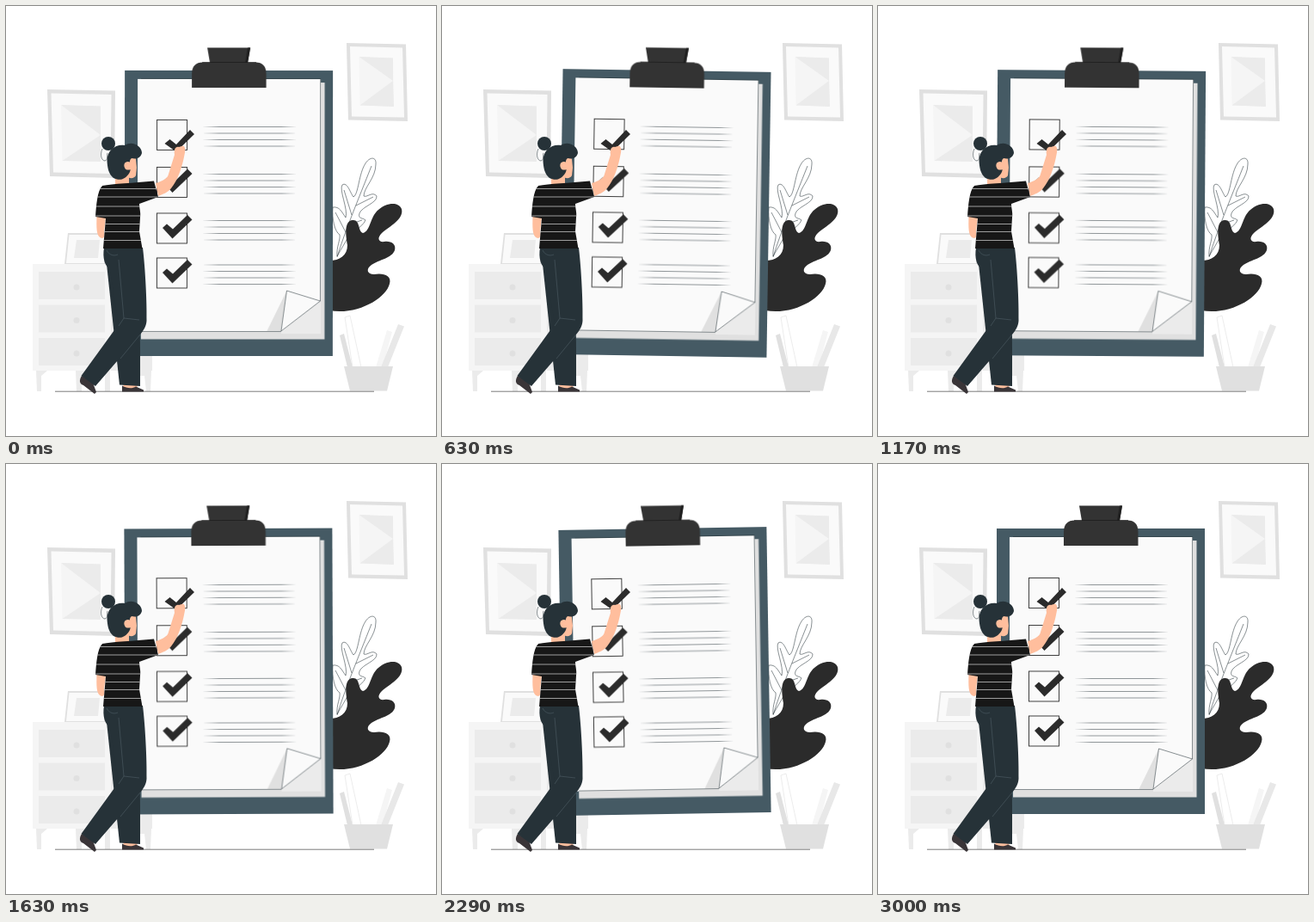
These frames come from a looping animation (500x500 px, 3040 ms). An HTML page:

```html
<!DOCTYPE html>
<html lang="en">
<head>
<meta charset="utf-8">
<title>Checklist</title>
<style>
html, body { margin: 0; width: 100%; height: 100%; overflow: hidden; background: #fff; }
svg { display: block; width: 100vw; height: 100vh; }
#board {
  transform-origin: 259px 240px;
  animation: sway 3040ms linear infinite;
}
@keyframes sway {
  0% { transform: rotate(.04deg); }
  23.7% { transform: rotate(1deg); }
  73% { transform: rotate(-1deg); }
  100% { transform: rotate(.04deg); }
}
.ink { fill: #2b2b2b; }
.clip { fill: #333; }
.navy { fill: #263238; }
.skin { fill: #ffbe9d; }
.shoe { fill: #3a3538; }
.thin { fill: none; stroke: #263238; stroke-width: .55; }
.pale { fill: #fafafa; }
.g1 { fill: #f5f5f5; }
.g2 { fill: #ebebeb; }
.g3 { fill: #e0e0e0; }
</style>
</head>
<body>
<svg viewBox="0 0 500 500">
  <defs>
    <path id="tick" d="M7 17.5 12 13 19 19 36 2.500 41.500 8 18.500 30Z"/>
    <path id="rule" d="M0 0 20 -.35H92L110 0 92 .35H20Z"/>
    <path id="shirt" d="M112 209C124 206.500 148 206 172 203.500L177 222 155 230C155 236 157 240 156 246L155 262 158.500 282H113L116 247 104 245C105 232 106 215 112 209Z"/>
    <clipPath id="shirtClip"><use href="#shirt"/></clipPath>
  </defs>

  <!-- wall frames -->
  <path class="g3" d="M48 97 127 98.500 126 200 51 198Z"/>
  <path class="pale" d="M52.500 101.500 122.500 103 121.500 195 55 193.500Z"/>
  <path class="g1" d="M64 115 110 116.500 110 181 65.500 180Z"/>
  <path class="g2" d="M64 115 110 116.500V150Z"/>
  <path class="g2" d="M65.500 180 110 150V181Z"/>
  <path class="g3" d="M396 43 465 44.500 467 134 398 132.500Z"/>
  <path class="pale" d="M400 47 461 48.500 463 129.500 402 128.500Z"/>
  <path class="g1" d="M410.500 59 450 60.500 451 117 411.500 115.500Z"/>
  <path class="g2" d="M410.500 59 450 60.500V87Z"/>
  <path class="g2" d="M411.500 115.500 450 87 451 117Z"/>

  <!-- dresser -->
  <path class="g3" d="M72 264H119L115 300H68Z"/>
  <path class="pale" d="M73.500 266H118L114 299H70Z"/>
  <path class="g2" d="M82 272H109L107 293H79Z"/>
  <path class="g2" d="M35 424H48L41 430V448H36ZM81 424H121V448H115V430H88V448H82ZM155 424H169L168 448H163L161 430H155Z"/>
  <path class="g1" d="M31 300H122V424H31Z"/>
  <path class="g2" d="M122 300H170V424H122Z"/>
  <g id="drawers"></g>

  <!-- pencil pot -->
  <path class="g3" d="M388 383 393 381 403 420H397Z"/>
  <path fill="#fff" stroke="#e0e0e0" stroke-width=".6" d="M394 362 400 360 413 420H403Z"/>
  <path class="g1" d="M443 377 449 379 438 420H430Z"/>
  <path fill="#e8e8e8" d="M456 370 463 372.500 444 420H436Z"/>
  <path class="g3" d="M393 419H450L443 447.500H400Z"/>

  <path d="M57 448.200H428" stroke="#222" stroke-width=".6"/>

  <!-- plants -->
  <g class="thin">
    <path fill="#fff" d="M385 291C384 280 389 272 388 266C382 262 379 248 380 234C388 233 390 239 395 246C398 236 387 214 391 208C397 204 400 217 404 222C410 219 410 195 418 183C423 175 431 175 430 184C430 200 416 211 416 221C420 223 426 215 431 221C432 229 414 233 411 241C409 248 415 246 418 249C414 258 402 262 398 268C394 276 390 282 385 291Z"/>
    <path d="M385 292C394 262 410 224 425 186M395 263 383 240M402 243 393 214M407 232 427 222M399 254 414 249"/>
  </g>
  <path class="ink" d="M376 354V296C388 296 397 290 397 278C395 266 393 250 403 249C412 248 409 262 415 264C424 262 423 245 433 237C442 229 456 227 460 236C463 248 446 256 437 264C431 270 433 275 440 274C448 273 454 277 452 284C449 293 434 295 425 301C418 306 420 312 428 312C438 310 449 313 446 323C442 340 408 360 376 354Z"/>

  <g id="board">
    <path fill="#455a64" d="M138 75H380V407H138Z"/>
    <path class="g3" d="M157 89H370.500V387.500H157Z"/>
    <path class="pale" d="M153 85H366V343L320 379H153Z"/>
    <path class="g2" d="M366 343V381H320V379Z"/>
    <path class="thin" d="M157 84.500H365.500V343M157 378.500H320"/>
    <path class="g3" d="M326.500 331 303.500 378H320Z"/>
    <path class="thin pale" d="M326.500 331 365.500 343 320 378Z"/>
    <path class="clip" d="M234 48.500H284L281 66H237Z"/>
    <path d="M281 48.500H284L281 66H278Z" fill="#1f1f1f"/>
    <path class="clip" d="M216 95V79Q216 65.500 229 65.500H290Q302.500 65.500 302.500 79V95Z"/>
    <path d="M228 65.500H291" stroke="#171717" stroke-width=".6"/>
    <g id="items"></g>
  </g>

  <!-- person -->
  <path class="ink" d="M184.500 160 190.500 155 198 161 214 144 219 149 198 169.500Z"/>
  <path class="skin" d="M174 206C181 204 187 201 188.500 197L196 173C195 167 197 163 201 164L206 162.500C209 164 208.500 169 207.500 173C205 187 200 202 192 212C188 217 182 219 177 221Z"/>
  <path class="skin" d="M105.500 244 116 246 114 262C115 268 114 271 110 269.500C105 267 105 258 105.500 244Z"/>
  <path class="skin" d="M127 196 143 192V207C138 209 131 209 127 207Z"/>
  <path class="skin" d="M139 178 150.500 174 152 188 151 197C149 201 144 201 139 198Z"/>
  <path class="thin" d="M112 166C109 173 111 180 115 180C119 179 117 174 118 171"/>
  <circle class="navy" cx="119" cy="160" r="8"/>
  <path class="navy" d="M117.500 180C117 168 128 160 138 162C147 156 158 163 158 171C156 178 150 178 146 177C141 180 147 189 143.500 194C138 203 131 203 125 200C119 195 118 188 117.500 180Z"/>
  <path class="skin" d="M145 182C139 179 136 184 138 188C139 191 142 191 145 190Z"/>

  <path class="skin" d="M136 439H152L153 445H137Z"/>
  <path class="shoe" d="M88 430C85 435 85 439 90 441L103 451 105 449 101 438Z"/>
  <path class="shoe" d="M135 448.500V441.500C141 445 147 445 151 442.500L160 446.500V448.500Z"/>
  <path class="navy" d="M117 300H155L156 400V442L132 440.500Z"/>
  <path class="navy" d="M114 281H159C162 305 164 345 163.500 366C163 373 160 377 156 382L104 442 87.500 430 131 370 120.500 305C115 303 112 293 114 281Z"/>
  <path fill="none" stroke="#56676f" stroke-width=".5" d="M117 284C120 290 126 291 130 289M131 295 137 363 155 365M137 363 131 372M156 382 133 410"/>
  <use href="#shirt" fill="#171717"/>
  <g clip-path="url(#shirtClip)" stroke="#d9d9d9" stroke-width=".7" id="stripes"></g>
</svg>
<script>
const put = (id, html) => { document.getElementById(id).innerHTML = html; };

put('drawers', [309, 347.5, 386].map(y =>
  `<path class="g2" d="M38 ${y}H115V${y + 32}H38Z"/><circle class="g3" cx="82" cy="${y + 18}" r="3.5"/>`
).join(''));

put('stripes', [212.5, 222, 233, 244, 253.5, 262.5, 272.5].map(y =>
  `<path d="M100 ${y}H180"/>`
).join(''));

// one box and four rules per row; the first tick is still in the hand
put('items', [132.5, 187.5, 241, 293].map((y, row) => {
  const tick = row ? `<use href="#tick" class="ink" x="175" y="${y - .5}"/>` : '';
  const rules = [0, 1, 2, 3].map(i =>
    `<use href="#rule" class="navy" x="228" y="${[140.5, 195.5, 249.5, 301][row] + i * 7.5}"/>`
  ).join('');
  return `<rect x="175.5" y="${y}" width="35" height="35" fill="none" stroke="#2b2b2b" stroke-width=".9"/>${tick}${rules}`;
}).join(''));
</script>
</body>
</html>
```
